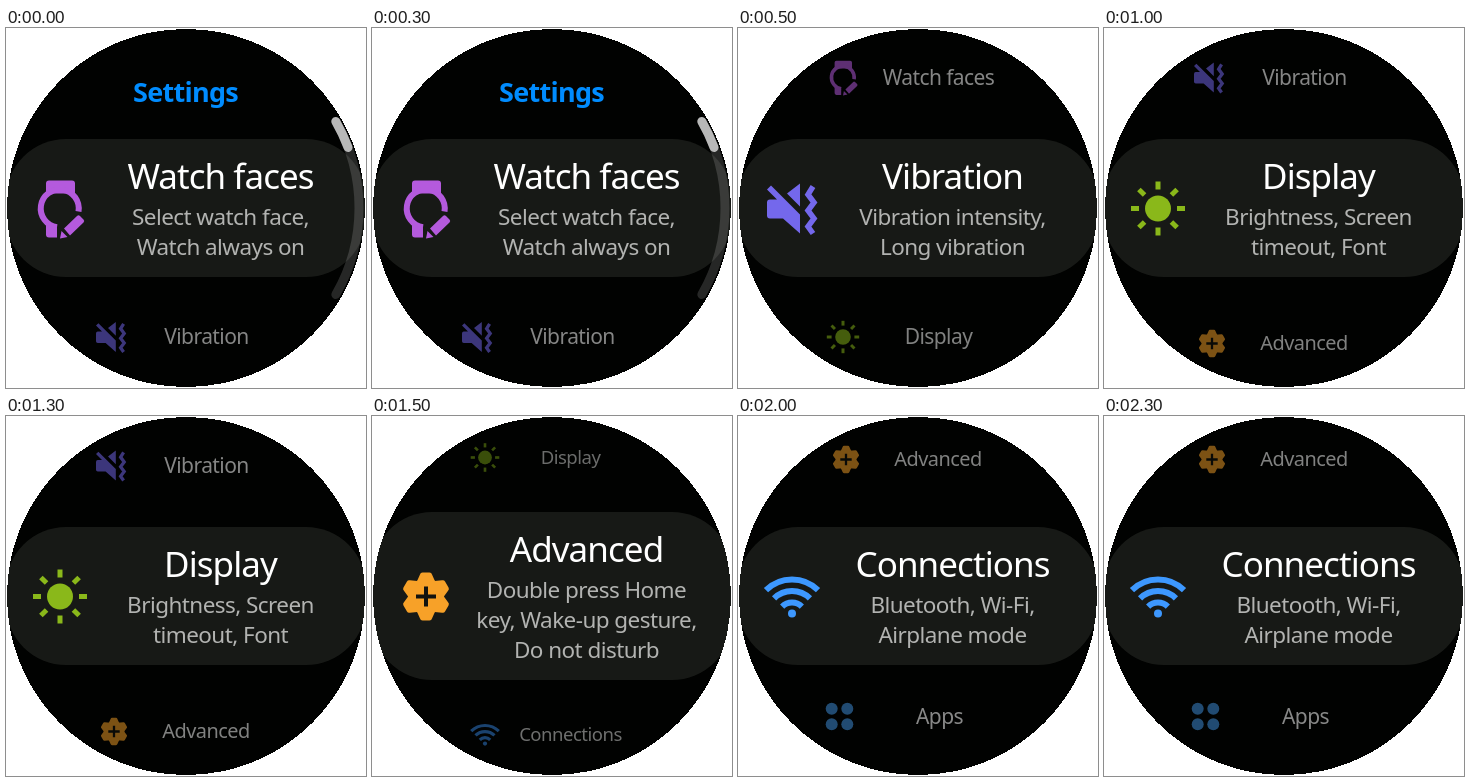
These frames come from a looping animation (360x360 px, 2500 ms). An HTML page:

```html
<!DOCTYPE html>
<html lang="en">
<head>
<meta charset="utf-8">
<title>Watch settings</title>
<style>
  html, body { margin: 0; width: 100%; height: 100%; overflow: hidden; background: #fff; }
  svg { display: block; width: 100vw; height: 100vh; }
  text { font-family: "Noto Sans", "Open Sans", sans-serif; text-anchor: middle; letter-spacing: -.027em; fill: #fff; }
  .title { font-size: 35px; }
  .sub { font-size: 22.5px; letter-spacing: -.025em; fill: #b2b3b1; }
  .head { font-size: 27px; font-weight: 600; fill: #008cff; }
  .scene { opacity: 0; }
</style>
</head>
<body>
<svg viewBox="0 0 360 360">
  <defs>
    <g id="watch" fill="#b45add">
      <path d="M-11-28H12Q15-28 15-25V-15H-14V-25Q-14-28-11-28ZM-14 15L-3 19V29H-11Q-14 29-14 26Z"/>
      <path d="M18.5 3A19 19 0 1 0-3 18.8" fill="none" stroke="#b45add" stroke-width="6"/>
      <path d="M4 20L17 7.5Q18.500 6 20 7.500L23.500 11Q25 12.500 23.500 14L10 27ZM0 30L1.500 22.500L7.500 28.500Z"/>
    </g>

    <g id="vibration" fill="#7468ec">
      <path d="M-5-15L8-25V-2ZM-21-23L8 6V25L-9 10H-22Q-25 10-25 7V-6Q-25-9-22-9H-15L-25-19Z"/>
      <path d="M21-22L16-14L22-6L16 2L22 10L16 18L21 25" fill="none" stroke="#7468ec" stroke-width="5.5"/>
    </g>

    <g id="sun" fill="#8ab81a"><circle r="13"/></g>

    <g id="gear" fill="#f7a128">
      <circle r="18"/>
      <path d="M-10 0H10M0-10V10" stroke="#12130f" stroke-width="4"/>
    </g>

    <g id="wifi" fill="none" stroke="#3d98ff" stroke-width="6">
      <circle cy="17" r="4" fill="#3d98ff" stroke="none"/>
    </g>

    <g id="apps" fill="#3f8fd8"></g>
  </defs>

  <rect width="360" height="360" fill="#010201"/>
  <g id="stage"></g>
  <path d="M0 0H360V360H0ZM1 180A179 179 0 0 0 359 180A179 179 0 0 0 1 180Z"
        fill="#fff" fill-rule="evenodd" shape-rendering="crispEdges"/>
</svg>

<script>
const NS = "http://www.w3.org/2000/svg";
const STEP = 500;
const byId = id => document.getElementById(id);

function add(parent, tag, attrs, text) {
  const el = document.createElementNS(NS, tag);
  for (const k in attrs) el.setAttribute(k, attrs[k]);
  if (text) el.textContent = text;
  return parent.appendChild(el);
}

// Repeated icon parts
for (let a = 0; a < 360; a += 45)
  add(byId("sun"), "rect", { x: -2.5, y: -27, width: 5, height: 8, transform: `rotate(${a})` });
for (let a = 0; a < 360; a += 60) {
  const tooth = add(byId("gear"), "path", {
    d: "M-10-13L-6-22Q-5.500-24-3.500-24H3.500Q5.500-24 6-22L10-13Z", transform: `rotate(${a})`
  });
  byId("gear").prepend(tooth);
}
for (const r of [37, 25.5, 14]) {
  const x = r * Math.sin(.78), y = 20 - r * Math.cos(.78);
  add(byId("wifi"), "path", { d: `M${-x} ${y}A${r} ${r} 0 0 1 ${x} ${y}` });
}
for (const x of [-13, 13])
  for (const y of [-13, 13]) add(byId("apps"), "circle", { cx: x, cy: y, r: 10 });

const items = {
  watch: ["Watch faces", "Select watch face,", "Watch always on"],
  vibration: ["Vibration", "Vibration intensity,", "Long vibration"],
  sun: ["Display", "Brightness, Screen", "timeout, Font"],
  gear: ["Advanced", "Double press Home", "key, Wake-up gesture,", "Do not disturb"],
  wifi: ["Connections", "Bluetooth, Wi-Fi,", "Airplane mode"],
  apps: ["Apps"]
};

// Neighbour rows: [item, icon x, label x, y, scale, opacity]
const scenes = [
  { main: "watch", rows: [["vibration", 105, 200.5, 309, .6, .52]] },
  { main: "vibration", rows: [["watch", 105, 200.5, 49.5, .6, .52], ["sun", 105, 200.5, 309, .6, .5]] },
  { main: "sun", rows: [["vibration", 105, 200.5, 49.5, .6, .52], ["gear", 108, 200, 315.5, .57, .5]] },
  { main: "gear", rows: [["sun", 113, 198.5, 41.5, .53, .42], ["wifi", 113, 198.5, 318.5, .53, .43]] },
  { main: "wifi", rows: [["gear", 108, 200, 43.5, .57, .5], ["apps", 101.5, 201.5, 300.5, .6, .53]] }
];

function icon(parent, id, x, y, s) {
  add(parent, "use", { href: "#" + id, transform: `translate(${x} ${y}) scale(${s})` });
}

function card(g, id) {
  const [title, ...lines] = items[id];
  const top = 141 - 15 * lines.length;
  add(g, "rect", { y: top, width: 360, height: 360 - 2 * top, rx: 60, fill: "#171916" });
  icon(g, id, 54, 180.5, 1);
  add(g, "text", { class: "title", x: 214.5, y: top + 50 }, title);
  lines.forEach((t, i) => add(g, "text", { class: "sub", x: 214.5, y: top + 86 + 30 * i }, t));
}

function row(g, [id, ix, tx, y, s, opacity]) {
  const r = add(g, "g", { opacity });
  icon(r, id, ix, y, s);
  add(r, "text", { x: tx, y: y + 12 * s, "font-size": 35 * s }, items[id][0]);
}

function arc(g, from, to, stroke, opacity) {
  const at = deg => {
    const a = deg * Math.PI / 180;
    return `${180 + 173 * Math.cos(a)} ${180 + 173 * Math.sin(a)}`;
  };
  add(g, "path", {
    d: `M${at(from)}A173 173 0 0 1 ${at(to)}`, fill: "none", stroke,
    "stroke-opacity": opacity, "stroke-width": 9, "stroke-linecap": "round"
  });
}

scenes.forEach(({ main, rows }, i) => {
  const g = add(byId("stage"), "g", { class: "scene" });
  card(g, main);
  rows.forEach(r => row(g, r));
  if (i === 0) {
    add(g, "text", { class: "head", x: 179.5, y: 73.5 }, "Settings");
    arc(g, -30, 30, "#fff", .15);
    arc(g, -30, -20.5, "#b8b8b8", 1);
  }
  const n = scenes.length;
  g.animate([
    { opacity: 1, offset: 0 }, { opacity: 1, offset: 1 / n },
    { opacity: 0, offset: 1 / n }, { opacity: 0, offset: 1 }
  ], { duration: n * STEP, delay: (i - n) * STEP, iterations: Infinity });
});
</script>
</body>
</html>
```
